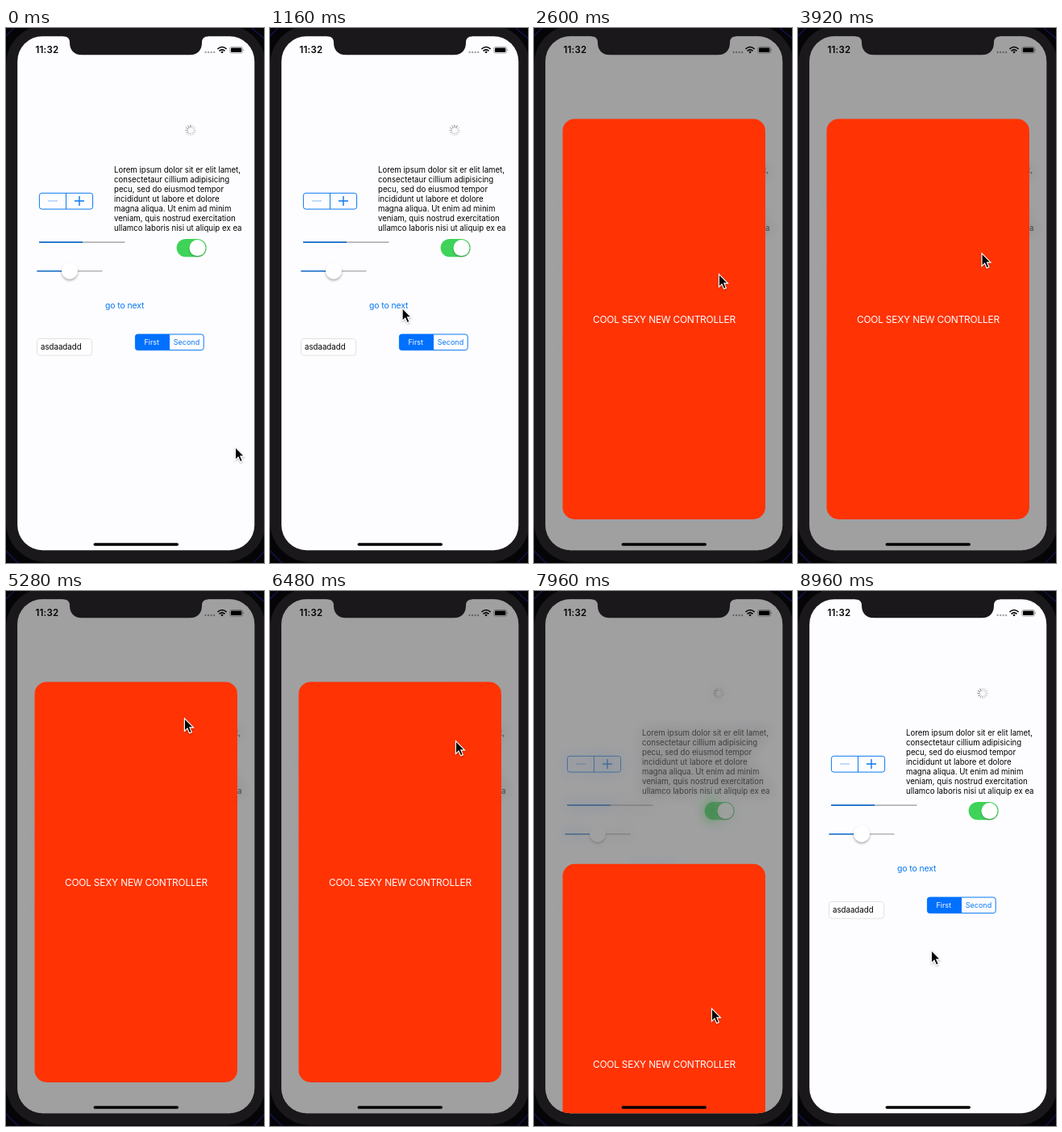
Write an HTML page that moves like this. It is 320 px wide and 662 px high and loops after 9000 ms.

```html
<!DOCTYPE html>
<html lang="en">
<head>
<meta charset="utf-8">
<title>Card presentation</title>
<style>
  html, body { margin: 0; width: 100%; height: 100%; overflow: hidden; background: #050508; }
  svg { display: block; width: 100vw; height: 100vh; }
  text { font-family: Inter, "Liberation Sans", sans-serif; white-space: pre; }
  .line { fill: none; stroke: #0a78f0; }
</style>
</head>
<body>
<svg viewBox="0 0 320 662" preserveAspectRatio="none">
  <defs>
    <clipPath id="screen"><rect x="14.2" y="10.2" width="294" height="636" rx="31"/></clipPath>
    <filter id="blur" x="-20%" y="-20%" width="140%" height="140%">
      <feGaussianBlur stdDeviation="8"/>
      <feColorMatrix type="saturate" values="1.5"/>
    </filter>
    <filter id="lift" x="-50%" y="-50%" width="200%" height="200%">
      <feDropShadow dx="0" dy="1.8" stdDeviation="1.6" flood-opacity=".36"/>
    </filter>
    <filter id="soft" x="-50%" y="-50%" width="200%" height="200%">
      <feDropShadow dx="0" dy="1" stdDeviation=".8" flood-opacity=".35"/>
    </filter>
  </defs>

  <path stroke="#15155c" stroke-width="1.1" d="M0 10L10 0M305 0L320 13M0 647L15 662M307 662L320 648"/>
  <rect x="0" y="-4" width="322" height="665" rx="50" fill="#1a181b"/>

  <g clip-path="url(#screen)">
    <rect x="14" y="10" width="295" height="637" fill="#fdfdff"/>
    <use id="halo" href="#ui" filter="url(#blur)"/>
    <g id="ui">
      <g id="spinner" stroke="#8a8a8c" stroke-width="1.1" stroke-linecap="round"></g>
      <g id="lorem" font-size="9.65" letter-spacing=".01"></g>

      <rect class="line" x="41.4" y="204.3" width="66.2" height="19.8" rx="3"/>
      <path class="line" d="M74.5 204.5V224"/>
      <path class="line" d="M85 214H97M91 208V220" stroke-width="1.4"/>
      <path class="line" d="M52 214H64" stroke-width="1.2" opacity=".5"/>

      <path d="M41 265.1H147.5" stroke="#b3b3b5" stroke-width="1.6"/>
      <path d="M41 265.1H95" stroke="#1670cf" stroke-width="1.6"/>
      <path d="M38.5 300.8H119.5" stroke="#b3b3b5" stroke-width="1.5"/>
      <path d="M38.5 300.8H79" stroke="#1670cf" stroke-width="1.5"/>
      <circle cx="79" cy="300.5" r="10" fill="#fff" filter="url(#lift)"/>

      <rect x="211.6" y="261" width="37" height="22.2" rx="11.1" fill="#3fd35a"/>
      <circle cx="237.5" cy="272.1" r="10" fill="#fff" filter="url(#soft)"/>

      <text x="123" y="347.1" font-size="10.4" letter-spacing="-.09" fill="#0a78f0">go to next</text>

      <rect x="38.5" y="384.5" width="68.2" height="20.7" rx="3.6" fill="#fff" stroke="#dedee0" stroke-width=".9"/>
      <text x="43" y="398" font-size="9.7">asdaadadd</text>

      <rect class="line" x="160.4" y="379" width="84.8" height="19.6" rx="3"/>
      <path d="M203 379V398.6H163.4a3 3 0 0 1-3-3V382a3 3 0 0 1 3-3Z" fill="#0070ff"/>
      <g font-size="9" text-anchor="middle">
        <text x="180.7" y="392.2" fill="#fff">First</text>
        <text x="224" y="392.2" fill="#0a78f0">Second</text>
      </g>
    </g>
    <rect id="dim" x="14" y="10" width="295" height="637"/>
    <g id="card">
      <rect x="35.5" y="112.4" width="251.4" height="495.6" rx="15" fill="#ff3304"/>
      <text x="161.4" y="364.7" font-size="11.9" letter-spacing="-.2" text-anchor="middle" fill="#fff">COOL SEXY NEW CONTROLLER</text>
    </g>
    <rect x="108.5" y="637.2" width="105.5" height="3.6" rx="1.8"/>
  </g>

  <path fill="#1a181b" d="M71 8H251V10.2Q243 10.2 243 18C243 27 238 33.3 228 33.3H94C84 33.3 79 27 79 18Q79 10.2 71 10.2Z"/>
  <text x="36.4" y="31.3" font-size="11.5" font-weight="600" letter-spacing=".2">11:32</text>
  <g fill-opacity=".35">
    <circle cx="247.6" cy="30" r="1.2"/><circle cx="251.1" cy="30" r="1.2"/>
    <circle cx="254.6" cy="30" r="1.2"/><circle cx="258.1" cy="30" r="1.2"/>
  </g>
  <g fill="none" stroke="#000" stroke-width="1.6">
    <path d="M262.4 26Q268 21 273.6 26M264.5 28.3Q268 25.3 271.5 28.3"/>
    <path d="M266.3 29.4Q268 28.2 269.7 29.4L268 31.4Z" fill="#000" stroke="none"/>
  </g>
  <rect x="277.7" y="23.4" width="15.8" height="7.8" rx="2.2" fill="none" stroke="#000" stroke-opacity=".4" stroke-width=".8"/>
  <rect x="278.9" y="24.6" width="13.4" height="5.4" rx="1.2"/>
  <path d="M294.4 25.8Q295.8 27.3 294.4 28.8Z" fill-opacity=".5"/>

  <path id="cursor" d="M0 0V15.8L3.6 12.3L6.2 18.2L8.9 17L6.4 11.3H11.1Z" stroke="#fff" stroke-width="1.1" filter="url(#soft)"/>
</svg>
<script>
const LOOP = 9000;
const $ = id => document.getElementById(id);

function add(parent, tag, attrs, text = "") {
  const node = document.createElementNS("http://www.w3.org/2000/svg", tag);
  for (const name in attrs) node.setAttribute(name, attrs[name]);
  node.textContent = text;
  parent.append(node);
  return node;
}

[
  "Lorem ipsum dolor sit er elit lamet,",
  "consectetaur cillium adipisicing",
  "pecu, sed do eiusmod tempor",
  "incididunt ut labore et dolore",
  "magna aliqua. Ut enim ad minim",
  "veniam, quis nostrud exercitation",
  "ullamco laboris nisi ut aliquip ex ea"
].forEach((line, i) => add($("lorem"), "text", { x: 134, y: 179.4 + i * 11.87 }, line));

const spokes = Array.from({ length: 12 }, (_, i) => add($("spinner"), "path", {
  d: "M0-3.6V-6.4", transform: `translate(229 126.6) rotate(${i * 30})`
}));

const smooth = k => k * k * (3 - 2 * k);

// Each key is [time, ...values]; values ease between neighbouring keys.
function sample(keys, t) {
  const i = keys.findIndex(key => key[0] > t);
  if (i < 0) return keys.at(-1).slice(1);
  if (i === 0) return keys[0].slice(1);
  const a = keys[i - 1], b = keys[i];
  const k = smooth((t - a[0]) / (b[0] - a[0]));
  return a.slice(1).map((v, j) => v + (b[j + 1] - v) * k);
}

const cursorKeys = [
  [300, 284, 518], [1200, 163, 345], [1800, 163, 345], [2500, 229, 304], [3600, 229, 304],
  [4800, 221, 157], [5500, 221, 157], [6300, 230, 185], [6600, 230, 185],
  [7200, 225, 291], [7960, 220, 516], [8200, 220, 516], [8800, 165, 444]
];
const cardKeys = [[1580, 540], [2100, 0], [7200, 0], [7960, 225.4], [8060, 225.4], [8400, 540]];
const dimKeys = [[1280, 0], [1560, 1], [8180, 1], [8500, 0]];

function render(t) {
  const [x, y] = sample(cursorKeys, t);
  const [drop] = sample(cardKeys, t);
  const [dim] = sample(dimKeys, t);
  $("cursor").setAttribute("transform", `translate(${x + 0.4} ${y + 0.6})`);
  $("card").setAttribute("transform", `translate(0 ${drop})`);
  $("dim").setAttribute("opacity", 0.37 * dim);
  $("halo").setAttribute("opacity", 0.85 * dim);
  $("ui").setAttribute("opacity", 1 - 0.42 * dim);
  const head = Math.floor(t / 1000 * 12);
  spokes.forEach((spoke, i) => {
    const age = ((head - i) % 12 + 12) % 12;
    spoke.setAttribute("opacity", Math.max(0.4, 1 - age * 0.1));
  });
}

let start;
function tick(now) {
  start ??= now;
  render((now - start) % LOOP);
  requestAnimationFrame(tick);
}
render(0);
requestAnimationFrame(tick);
</script>
</body>
</html>
```
